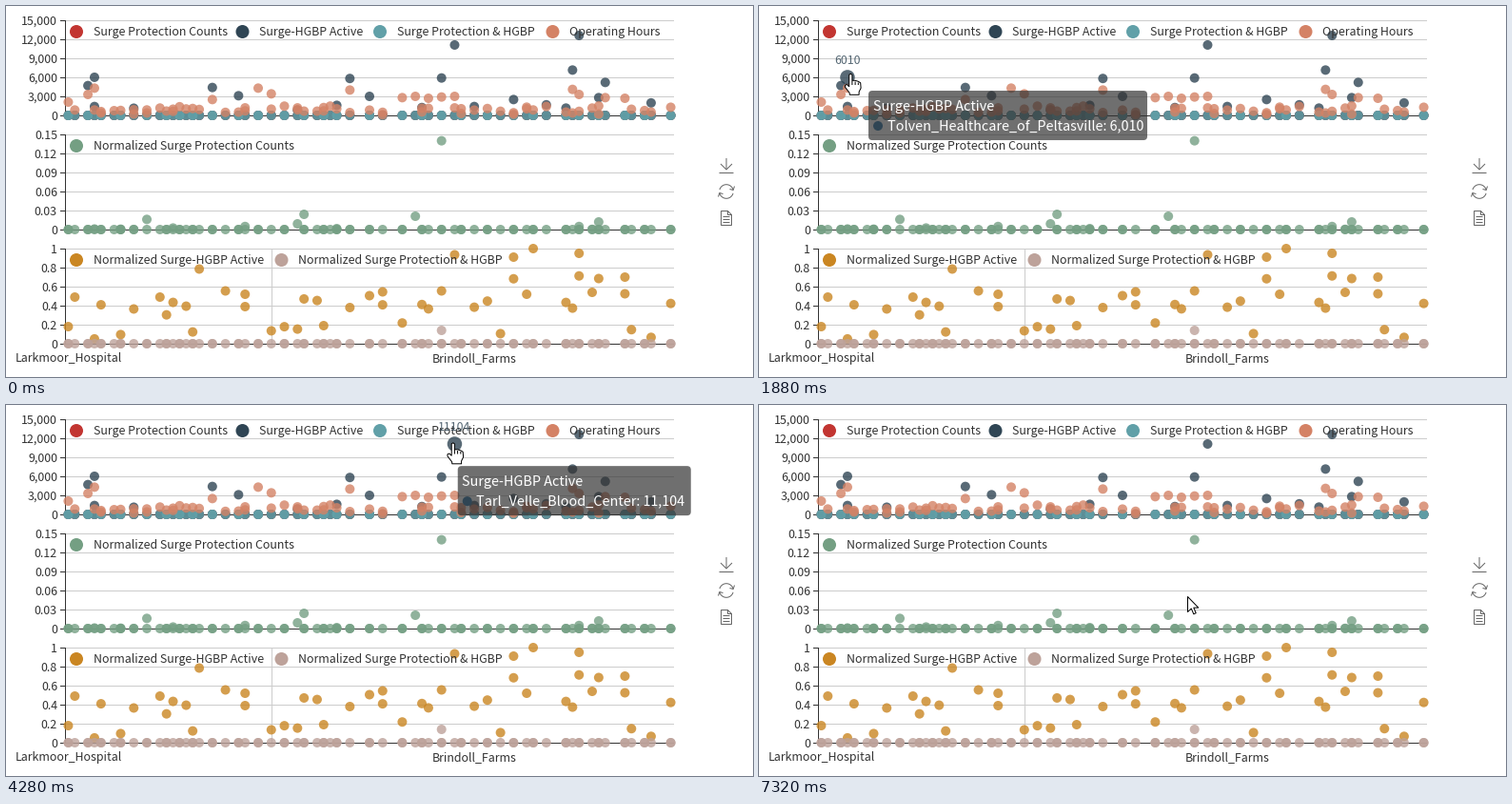
A matplotlib script for the animation above (8000 ms loop, 785 px wide and 390 px high).

```python
import numpy as np
import matplotlib.pyplot as plt
from matplotlib.animation import FuncAnimation
from matplotlib.patches import FancyBboxPatch, Polygon

W, H, DPI = 785, 390, 100
PX = 72 / DPI
STEP, LOOP = 40, 8000

RED, NAVY, TEAL, ORANGE = "#c23531", "#2f4554", "#61a0a8", "#d48265"
GREEN, GOLD, MAUVE = "#749f83", "#ca8622", "#bda29a"
DARK, GRID, ICON = "#333333", "#cccccc", "#666666"

plt.rcParams["font.family"] = "Noto Sans CJK JP"
plt.rcParams["path.snap"] = False
fig = plt.figure(figsize=(W / DPI, H / DPI), dpi=DPI, facecolor="white")
ax = fig.add_axes([0, 0, 1, 1])
ax.set_xlim(0, W)
ax.set_ylim(H, 0)
ax.axis("off")

LEFT, RIGHT, BANDS = 62, 702, 93


def col(i):
    return LEFT + (np.asarray(i) + 0.5) * (RIGHT - LEFT) / BANDS


def line(xs, ys, color, z=1):
    return ax.plot(xs, ys, color=color, lw=PX, zorder=z,
                   solid_capstyle="butt", solid_joinstyle="miter")[0]


def label(x, y, text, ha="left", size=12.4, color=DARK, z=6):
    return ax.text(x, y, text, ha=ha, va="baseline", fontsize=size * PX,
                   color=color, zorder=z)


def dots(xs, ys, color, size=10, alpha=0.8, z=3):
    marks = ax.scatter(xs, ys, s=(size * PX) ** 2, alpha=alpha,
                       linewidths=0, zorder=z)
    # two equal colours keep the centres off the whole-pixel grid
    marks.set_facecolor([color] * 2)
    return marks


def series(pts, top, vmax, color, z):
    idx, val = np.array(pts).T
    dots(col(idx), top + 100 - val / vmax * 100, color, z=z)


def panel(top, ticks):
    step = 100 / (len(ticks) - 1)
    for k, text in enumerate(ticks):
        y = top + 100 - k * step + 0.5
        line([LEFT, RIGHT], [y, y], GRID if k else DARK, z=1 if k else 1.5)
        line([LEFT - 5, LEFT], [y, y], DARK, z=2)
        label(54, y + 4.2, text, "right")
    line([LEFT + 0.5] * 2, [top, top + 101], DARK, z=2)


def legend(x, y, text, color):
    dots([x], [y], color, size=14, alpha=1, z=5)
    label(x + 17.6, y + 4.5, text)


# Axes
panel(15, [f"{v:,}" for v in range(0, 15001, 3000)])
panel(135, [f"{v * 0.03:.2g}" for v in range(6)])
panel(255, [f"{v / 5:.2g}" for v in range(6)])
line([279.5, 279.5], [255, 355], GRID)
label(65.5, 374, "Larkmoor_Hospital", "center")
label(492.2, 374, "Brindoll_Farms", "center")

# Runs (first band, length) in which every second band is empty
RUNS = [(2, 1), (6, 1), (9, 3), (21, 3), (28, 4), (37, 1), (42, 2), (45, 3),
        (50, 2), (56, 2), (61, 5), (72, 2), (84, 1), (90, 1)]
EMPTY = {first + 2 * k for first, n in RUNS for k in range(n)}
EMPTY |= set(range(75, BANDS, 4))
USED = [i for i in range(BANDS) if i not in EMPTY]
ZEROS = [(i, 0) for i in USED]


def scatter_rule(peaks, share, low, high, seed):
    """Given peaks, plus random values on a share of the other bands."""
    rng = np.random.default_rng(seed)
    draw = zip(USED, rng.random(len(USED)), rng.uniform(low, high, len(USED)))
    return list(peaks.items()) + [(i, v) for i, p, v in draw
                                  if p < share and i not in peaks]


active = {3: 4.7, 22: 4.4, 26: 3.1, 43: 5.82, 46: 3, 57: 5.9, 68: 2.5,
          77: 7.15, 78: 12.6, 81: 2.8, 82: 5.2}
hours = {0: 2.1, 3: 3.3, 4: 4.3, 22: 2.5, 29: 4.3, 31: 3.4, 43: 4, 51: 2.8,
         53: 3, 55: 2.7, 57: 2.9, 59: 3, 77: 4.1, 78: 3.3, 82: 2.8, 85: 2.7}
counts = {12: .016, 35: .009, 36: .024, 53: .021, 57: .14, 81: .012}
norm = {1: .49, 14: .49, 20: .785, 24: .555, 27: .52, 43: .38, 46: .505,
        48: .545, 57: .555, 59: .935, 68: .91, 70: .52, 71: 1, 78: .95,
        80: .54, 81: .685, 85: .7}

series(ZEROS, 15, 15, RED, 3.0)
series(ZEROS, 15, 15, NAVY, 3.1)
series(scatter_rule(active, 0.35, 0.7, 2.1, 4), 15, 15, NAVY, 3.1)
series(ZEROS, 15, 15, TEAL, 3.2)
series(ZEROS[::2], 15, 15, TEAL, 3.2)
series(scatter_rule(hours, 1, 0.3, 1.5, 8), 15, 15, ORANGE, 3.3)
series(scatter_rule({}, 0.35, 0.1, 1.2, 5), 15, 15, ORANGE, 3.3)
series([p for p in ZEROS if p[0] not in (12, 35, 53)], 135, .15, GREEN, 3.0)
series(ZEROS[::2], 135, .15, GREEN, 3.0)
series(scatter_rule(counts, 0.2, 0, .005, 2), 135, .15, GREEN, 3.1)
series(scatter_rule(norm, 0.6, .04, .48, 11), 255, 1, GOLD, 3.0)
series([(i, v * 0.75) for i, v in list(norm.items())[4::3]],
       255, 1, GOLD, 3.0)
series(ZEROS, 255, 1, MAUVE, 3.1)
series(ZEROS[::2] + [(57, .14)], 255, 1, MAUVE, 3.1)

legend(74, 27, "Surge Protection Counts", RED)
legend(248.5, 27, "Surge-HGBP Active", NAVY)
legend(393, 27, "Surge Protection & HGBP", TEAL)
legend(574.5, 27, "Operating Hours", ORANGE)
legend(74, 147, "Normalized Surge Protection Counts", GREEN)
legend(74, 267, "Normalized Surge-HGBP Active", GOLD)
legend(289.5, 267, "Normalized Surge Protection & HGBP", MAUVE)

# Toolbox: save, refresh, data view
line([757, 757], [160, 172], ICON)
line([751, 757, 763], [166, 172, 166], ICON)
line([749.5, 764.5], [175.5, 175.5], ICON)
arc = np.radians(np.linspace(12, 165, 24))
for s in (1, -1):
    line(757 + s * 7.3 * np.cos(arc), 195 - s * 7.3 * np.sin(arc), ICON)
    line(757 + s * np.array([3.5, 7.2, 8.5]),
         195 + s * np.array([-2.5, -1.5, -5.5]), ICON)
line([758.5, 762.5, 762.5, 751.5, 751.5, 758.5, 758.5, 762.5],
     [215.5, 219.5, 230.5, 230.5, 215.5, 215.5, 219.5, 219.5], ICON)
for y in (221.5, 224.5, 227.5):
    line([753.5, 760.5], [y, y], ICON)

# Hovered points: (from, to, band, value)
HOVERS = [(1560, 2160, 4, 6010), (4160, 5600, 59, 11104)]
hot = []
for _, _, band, value in HOVERS:
    x, y = col(band), 115 - value / 150
    tag = label(x, y - 14, str(value), "center", color=NAVY, z=7)
    tag.set_alpha(0.8)
    hot.append((dots([x], [y], NAVY, z=3.4), tag))

# Tooltips: (from, to, start, end, width, colour, title, text)
CLINIC = "Tolven_Healthcare_of_Peltasville: 6,010"
ACTIVE = "Surge-HGBP Active"
TIPS = [
    (960, 1320, (352, 268), (104, 118), 129, ORANGE,
     "Operating Hours", "ST_ORVYN: 971"),
    (1560, 2280, (135, 105), (115, 89), 293, NAVY, ACTIVE, CLINIC),
    (2280, 2600, (115, 89), (135, 105), 293, NAVY, ACTIVE, CLINIC),
    (3560, 4040, (115, 107), (351, 97), 262, NAVY, ACTIVE,
     "Osterlittale_Medical_Center: 5,820"),
    (4120, 5680, (379, 92), (489, 60), 245, NAVY, ACTIVE,
     "Tarl_Velle_Blood_Center: 11,104"),
]
box = FancyBboxPatch((0, 0), 100, 52, boxstyle="round,pad=0,rounding_size=4",
                     fc=(50 / 255, 50 / 255, 50 / 255, 0.7), ec="none",
                     zorder=10)
ax.add_patch(box)
tip_dot = dots([0], [0], NAVY, alpha=1, z=11)
tip_title = label(0, 0, "", size=14.4, color="white", z=11)
tip_text = label(0, 0, "", size=14.4, color="white", z=11)
tip_parts = (box, tip_dot, tip_title, tip_text)

# Pointers, drawn relative to their tip
ARROW = np.array([(0, 0), (0, 16), (3.8, 12.5), (6.3, 18.3), (8.7, 17.2),
                  (6.3, 11.6), (11.3, 11.6)])
HAND = np.array([(-1.6, 1), (0, 0), (1.6, 1), (1.6, 7), (4.8, 7), (8, 8),
                 (10.4, 9.5), (10.8, 15), (8.8, 19), (8.8, 22), (-1, 22),
                 (-1.2, 20), (-5.8, 14), (-5.8, 12), (-4, 11.2),
                 (-1.6, 13.4)]) - (0.7, 0.7)
pointer = Polygon(ARROW, fc="white", ec="black", lw=PX, joinstyle="round",
                  zorder=12)
ax.add_patch(pointer)
fingers = [line([], [], "black", z=13) for _ in range(3)]

# Pointer moves: (from, to, x, y); it rests in between
START = (728, 350)
MOVES = [(520, 720, 332, 248), (720, 840, 19, 60), (840, 960, 84, 109),
         (1400, 1560, 97, 72), (2280, 2600, 102, 82), (3280, 3560, 416.5, 77),
         (3560, 4040, 440, 50), (4120, 4240, 470.5, 40.5),
         (5560, 6000, 482, 139.5), (6000, 6360, 466, 160),
         (6880, 7000, 100, 123), (7000, 7160, 773, 150),
         (7160, 7320, 450.5, 201.5)]


def place_tip(t):
    tip = next((p for p in TIPS if p[0] <= t < p[1]), None)
    for part in tip_parts:
        part.set_visible(tip is not None)
    if tip is None:
        return
    t0, _, start, end, width, color, title, text = tip
    ease = 1 - (1 - min((t - t0) / 400, 1)) ** 4
    x, y = (a + (b - a) * ease for a, b in zip(start, end))
    box.set_bounds(x, y, width, 52)
    tip_dot.set_offsets([(x + 10, y + 37)])
    tip_dot.set_facecolor([color] * 2)
    tip_title.set_text(title)
    tip_title.set_position((x + 4.7, y + 20.6))
    tip_text.set_text(text)
    tip_text.set_position((x + 19.7, y + 41.2))


def pointer_at(t):
    pos = np.array(START, float)
    for t0, t1, x, y in MOVES:
        p = np.clip((t - t0) / (t1 - t0), 0, 1)
        pos += (np.array((x, y)) - pos) * p
    return pos


def place_pointer(t):
    hand = 920 <= t < 5640
    pos = pointer_at(t)
    pointer.set_visible(t >= 520)
    pointer.set_xy((HAND if hand else ARROW) + pos)
    for k, finger in enumerate(fingers):
        finger.set_visible(hand)
        x = pos[0] + 0.9 + 3.2 * k
        finger.set_data([x, x], [pos[1] + 6.5 + k, pos[1] + 11])


def update(i):
    t = i * STEP
    for (t0, t1, _, _), (dot, tag) in zip(HOVERS, hot):
        on = t0 <= t < t1
        dot.set_sizes([((15.5 if on else 10) * PX) ** 2])
        tag.set_visible(on)
    place_tip(t)
    place_pointer(t)
    return []


anim = FuncAnimation(fig, update, frames=LOOP // STEP, interval=STEP,
                     init_func=lambda: update(0), repeat=True, repeat_delay=0)
plt.show()
```
